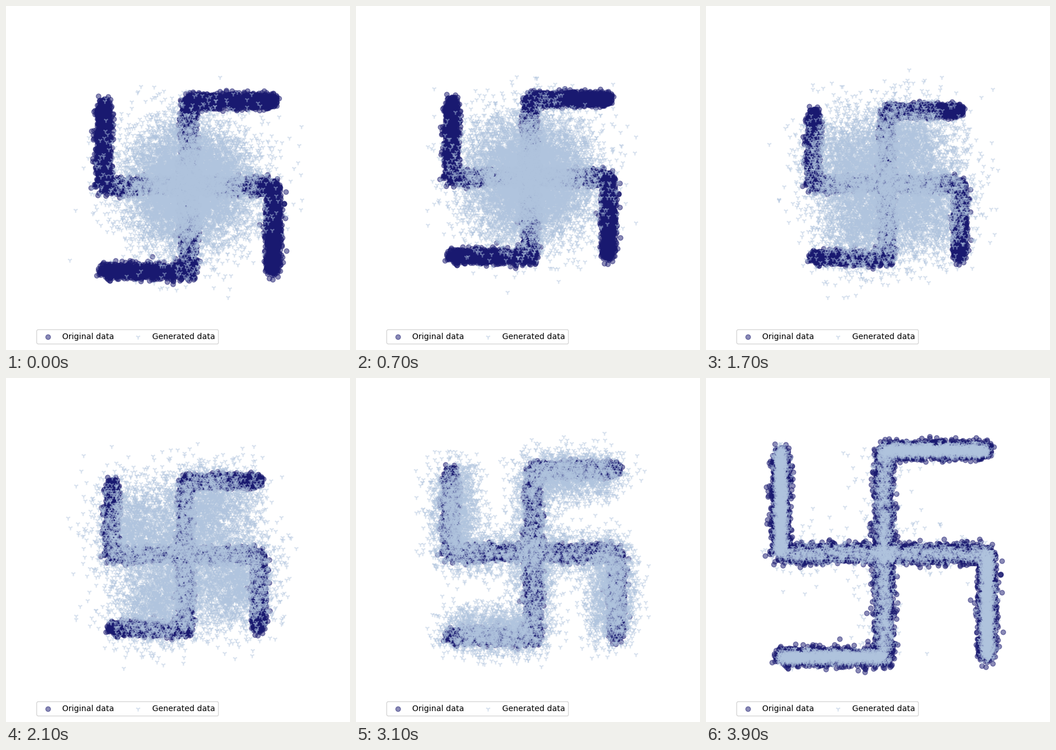
Animation of 600x600 px, one loop 4 s. Source, as a matplotlib script:

```python
import numpy as np
import matplotlib.pyplot as plt
from matplotlib.animation import FuncAnimation

SIZE, FRAMES, INTERVAL = 600, 40, 100
COUNT = 10000
CENTRE = np.array([310, 306])
BOX_MIN, BOX_MAX = (96, 93), (519, 514)
rng = np.random.default_rng(7)


def sample_shape(n, outer_share, inner_spread, outer_spread):
    """Points along four bent arms, each a quarter turn from the last."""
    s = rng.random(n)
    outer = rng.random(n) < outer_share
    x = np.where(outer, s, 0)
    y = np.where(outer, -1, -s)
    turn = rng.integers(0, 4, n)
    for k in range(1, 4):
        x, y = np.where(turn >= k, -y, x), np.where(turn >= k, x, y)
    spread = np.where(outer, outer_spread, inner_spread)[:, None]
    points = np.column_stack([x, y]) + spread * rng.normal(size=(n, 2))
    return points, outer


data, _ = sample_shape(COUNT, 0.5, 0.044, 0.044)
goal, outer = sample_shape(COUNT, 0.7, 0.043, 0.032)
noise_a, noise_b = rng.normal(size=(2, COUNT, 2))
# A few points of the inner arms never settle fully.
stray = ~outer & (rng.random(COUNT) < 0.09)
floor = np.where(stray, 0.17, 0)[:, None]


def to_pixels(points, t):
    """The view first widens, then closes in, with a fading sway."""
    half = 148 - 65 * t + 97 * t**3
    sway = 9 * (1 - t) * np.cos(4 * np.pi * t + 0.47)
    return CENTRE + sway + half * points


def generated(i, t):
    pull = np.sin(np.pi / 2 * t) ** 1.2
    level = 0.37 * max(np.cos(np.pi / 2 * t), 0) ** 0.8
    phase = 0.3 * i
    noise = np.cos(phase) * noise_a + np.sin(phase) * noise_b
    p = to_pixels(pull * goal + np.maximum(level, floor) * noise, t)
    inside = ((p >= BOX_MIN) & (p <= BOX_MAX)).all(axis=1)
    return p[inside]


fig = plt.figure(figsize=(SIZE / 100, SIZE / 100), dpi=100,
                 facecolor="white")
ax = fig.add_axes([0, 0, 1, 1])
ax.set_xlim(0, SIZE)
ax.set_ylim(SIZE, 0)
ax.axis("off")

dots = ax.scatter([], [], color="midnightblue", alpha=0.5,
                  label="Original data")
marks = ax.scatter([], [], color="lightsteelblue", alpha=0.5, marker="1",
                   label="Generated data")
ax.legend(loc="upper right", bbox_to_anchor=(370.3, 564), borderaxespad=0,
          bbox_transform=ax.transData, ncol=2)


def update(i):
    t = i / (FRAMES - 1)
    dots.set_offsets(to_pixels(data, t))
    marks.set_offsets(generated(i, t))
    return dots, marks


anim = FuncAnimation(fig, update, frames=FRAMES, interval=INTERVAL,
                     repeat=True, repeat_delay=0)
plt.show()
```
